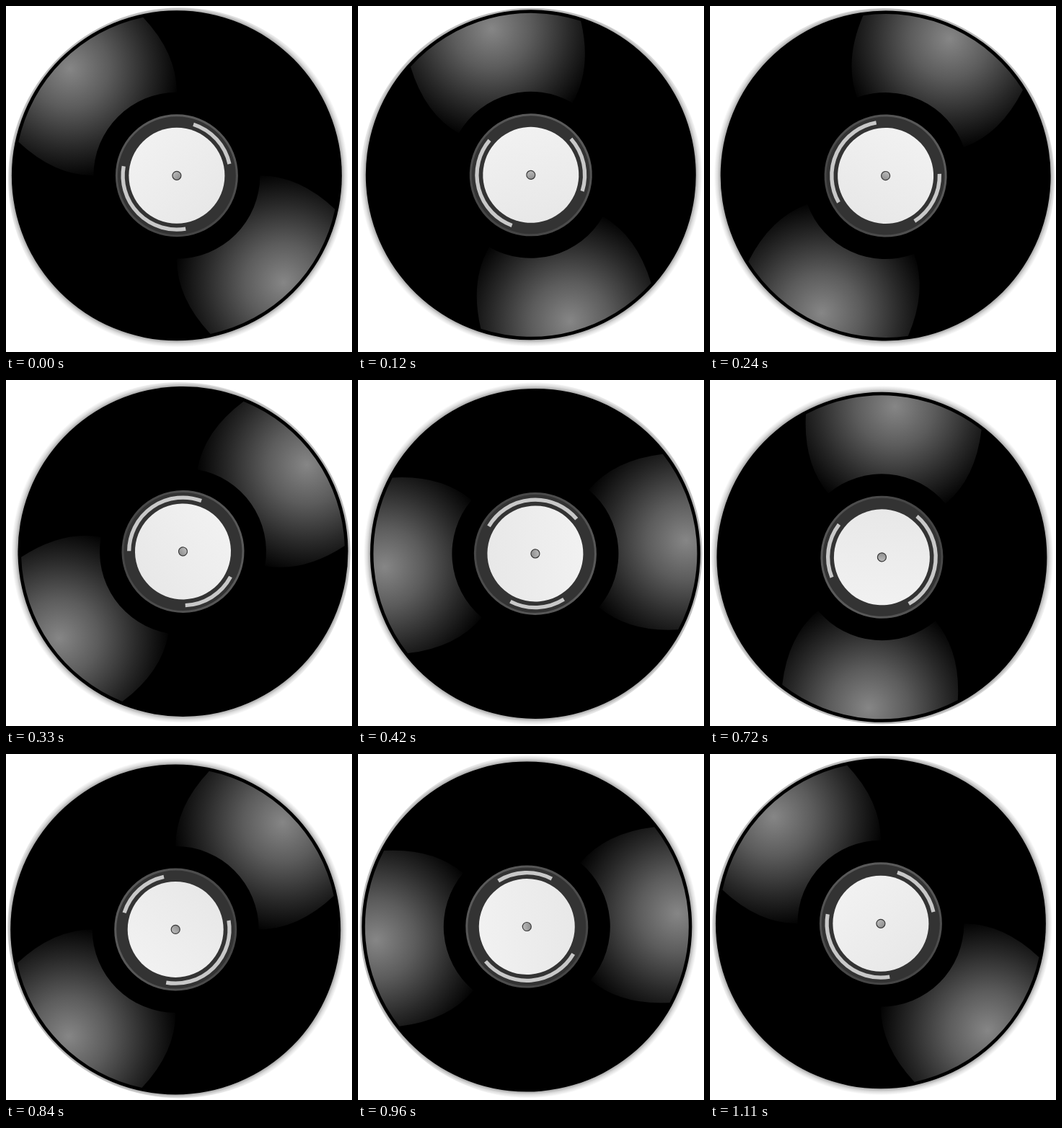
An HTML page that plays this animation: 480x480 px, repeating every 1.14 s.

```html
<!DOCTYPE html>
<html lang="en">
<head>
<meta charset="utf-8">
<title>Spinning record</title>
<style>
  html, body { margin: 0; width: 100%; height: 100%; overflow: hidden; background: #fff; }
  svg { display: block; width: 100%; height: 100%; }
</style>
</head>
<body>
<svg viewBox="0 0 480 480">
  <defs>
    <radialGradient id="shadow" gradientUnits="userSpaceOnUse" cx="0" cy="0" r="238">
      <stop offset=".93" stop-color="#000" stop-opacity=".62"/>
      <stop offset=".96" stop-color="#000" stop-opacity=".36"/>
      <stop offset=".98" stop-color="#000" stop-opacity=".13"/>
      <stop offset="1" stop-color="#000" stop-opacity="0"/>
    </radialGradient>
    <radialGradient id="glow" gradientUnits="userSpaceOnUse" cx="210" cy="0" r="155">
      <stop offset="0" stop-color="#868686"/>
      <stop offset=".35" stop-color="#5c5c5c"/>
      <stop offset=".7" stop-color="#292929"/>
      <stop offset="1" stop-color="#000"/>
    </radialGradient>
    <linearGradient id="rim" x1="0" y1="0" x2="0" y2="1">
      <stop offset="0" stop-color="#5a5a5a"/>
      <stop offset="1" stop-color="#454545"/>
    </linearGradient>
    <linearGradient id="paper" x1="0" y1="0" x2="1" y2="1">
      <stop offset="0" stop-color="#f3f3f3"/>
      <stop offset="1" stop-color="#e6e6e6"/>
    </linearGradient>
    <linearGradient id="hole" x1="0" y1="0" x2="1" y2="1">
      <stop offset="0" stop-color="#c4c4c4"/>
      <stop offset="1" stop-color="#858585"/>
    </linearGradient>
  </defs>
  <g id="spin">
    <!-- the disc sits slightly off the turning point -->
    <g transform="translate(236.9 235.3)">
      <circle cx="4" cy="5" r="238" fill="url(#shadow)"/>
      <circle r="229"/>
      <path class="shine" transform="rotate(45)" fill="url(#glow)"/>
      <path class="shine" transform="rotate(225)" fill="url(#glow)"/>
      <circle r="83.5" fill="#333" stroke="url(#rim)" stroke-width="3"/>
      <g fill="none" stroke="#c9c9c9" stroke-width="5.3">
        <path id="shortArc"/>
        <path id="longArc"/>
      </g>
      <circle r="66.5" fill="url(#paper)"/>
      <circle r="6" fill="url(#hole)" stroke="#3a3a3a" stroke-width="1.2"/>
    </g>
  </g>
</svg>
<script>
  const LOOP = 1140, STEP = 30, TURN = 10, HELD_STEP = 4;
  const byId = id => document.getElementById(id);

  function polar(r, deg) {
    const a = deg * Math.PI / 180;
    return (r * Math.cos(a)).toFixed(2) + ' ' + (r * Math.sin(a)).toFixed(2);
  }

  const arcTo = (r, deg, sweep) => `A${r} ${r} 0 0 ${sweep} ${polar(r, deg)}`;
  const arc = (r, from, to) => `M${polar(r, from)}${arcTo(r, to, 1)}`;

  const INNER = 115.5, OUTER = 224.5, BEND = 170;
  const shine = arc(INNER, -45, 45) +
    `Q${polar(BEND, 45)} ${polar(OUTER, 33)}` +
    arcTo(OUTER, -33, 0) +
    `Q${polar(BEND, -45)} ${polar(INNER, -45)}Z`;

  document.querySelectorAll('.shine').forEach(p => p.setAttribute('d', shine));
  byId('shortArc').setAttribute('d', arc(74.8, -72, -12.5));
  byId('longArc').setAttribute('d', arc(74.8, 80.5, 190));

  const spin = byId('spin');

  function draw(time) {
    const step = Math.floor((time % LOOP) / STEP);
    // one step early in the turn is held twice as long
    const angle = TURN * (step < HELD_STEP ? step : step - 1);
    spin.setAttribute('transform', `rotate(${angle} 240.1 240.2)`);
  }

  function tick() {
    draw(performance.now());
    requestAnimationFrame(tick);
  }
  tick();
</script>
</body>
</html>
```
